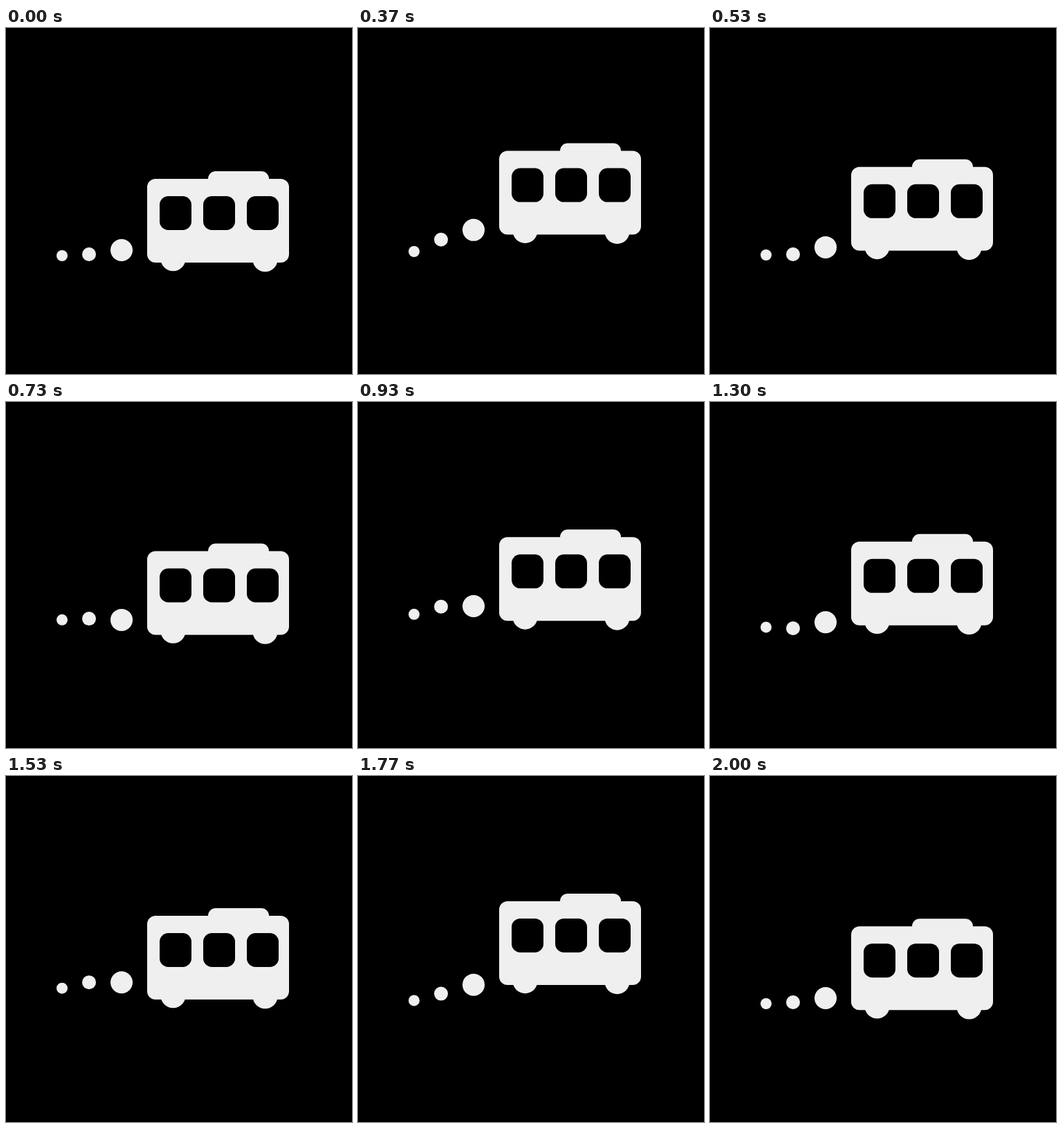
An HTML page for the animation above (2.06 s loop, 500 by 500 pixels).

```html
<!DOCTYPE html>
<html lang="en">
<head>
<meta charset="utf-8">
<title>Hopping bus</title>
<style>
  html, body { margin: 0; width: 100%; height: 100%; overflow: hidden; background: #000; }
  svg { display: block; width: 100%; height: 100%; }
</style>
</head>
<body>
<svg viewBox="0 0 500 500" fill="#efefef">
  <circle id="small" cx="81" cy="329" r="8"/>
  <circle id="medium" cx="120" cy="327" r="10"/>
  <circle id="large" cx="167" cy="321" r="16"/>
  <g id="bus">
    <circle cx="241.5" cy="333.3" r="18"/>
    <circle cx="374.5" cy="334.3" r="18"/>
    <rect x="292" y="207" width="88" height="30" rx="11"/>
    <rect x="204" y="218" width="205" height="121" rx="12"/>
    <g fill="#000">
      <rect x="222" y="243" width="46" height="49" rx="12.5"/>
      <rect x="285" y="243" width="46" height="49" rx="12.5"/>
      <rect x="348" y="243" width="46" height="49" rx="12.5"/>
    </g>
  </g>
</svg>
<script>
  const LOOP = 2060, FPS = 30, LAST_STEP = 60;

  // Turning points, in steps: ground, peak, ground, peak, ...
  const parts = [
    { id: 'small',  height: 22.3, floor: 0,   turns: [0, 5, 14.2, 27.5, 36.5, 46, 56] },
    { id: 'medium', height: 31.7, floor: 0,   turns: [0, 7.8, 16, 29, 39, 47.7, 57] },
    { id: 'large',  height: 31.5, floor: 0,   turns: [0, 9.5, 18, 31.8, 40.7, 48.9, 58.5] },
    { id: 'bus',    height: 40.4, floor: 0.8, turns: [0, 11, 20, 35, 42, 51.4, 60] }
  ];
  for (const part of parts) part.node = document.getElementById(part.id);

  const ease = x => (1 - Math.cos(Math.PI * x)) / 2;

  function lift({ height, floor, turns }, step) {
    const level = i => i % 2 ? height : i ? floor : 0;
    const next = turns.findIndex(turn => turn > step);
    if (next < 0) return level(turns.length - 1);
    const i = next - 1;
    const progress = (step - turns[i]) / (turns[next] - turns[i]);
    return level(i) + (level(next) - level(i)) * ease(progress);
  }

  function draw(ms) {
    const step = Math.min(LAST_STEP, Math.floor((ms + 3.5) * FPS / 1000));
    for (const part of parts) {
      part.node.setAttribute('transform', `translate(0 ${-lift(part, step).toFixed(2)})`);
    }
  }

  const start = performance.now();
  function tick() {
    draw((performance.now() - start) % LOOP);
    requestAnimationFrame(tick);
  }
  draw(0);
  requestAnimationFrame(tick);
</script>
</body>
</html>
```
